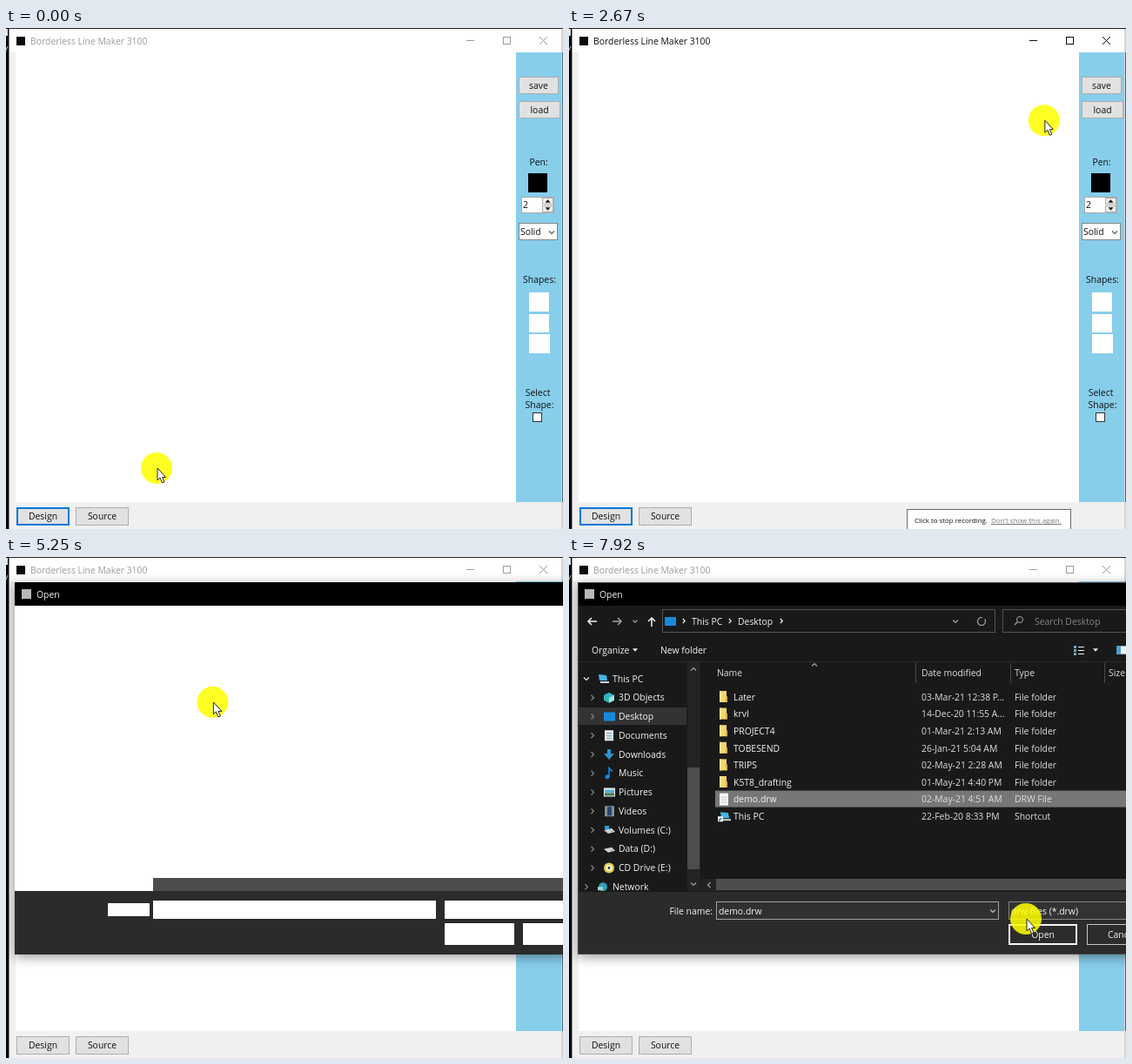
Recreate the animation shown at these times as an HTML page with a canvas. Size 640 px wide and 576 px high, loop 8000 ms.

```html
<!DOCTYPE html>
<html lang="en">
<head>
<meta charset="utf-8">
<title>Drawing tool</title>
<style>
html, body { margin: 0; width: 100%; height: 100%; overflow: hidden; background: #f0f0f0; }
canvas { display: block; width: 640px; height: 576px; }
</style>
</head>
<body>
<canvas id="stage" width="640" height="576"></canvas>
<script>
const view = document.getElementById('stage').getContext('2d');
const layer = document.createElement('canvas');
layer.width = 740; layer.height = 576;
const sheet = layer.getContext('2d');
let g = view;

const LOOP = 8000, STEP = 1000 / 12;
const FORM = '#f0f0f0', LINEN = '#f8ebd8', SKY = '#87ceeb', BUTTON = '#e1e1e1', INK = '#101010';
const BLUE = '#0078d7', PALE = '#f4f4f4', SOFT = '#dedede', MID = '#a6a6a6', DIM = '#6c6c6c';
const LIST = '#191919', PANEL = '#2b2b2b', HOVER = '#4d4d4d', PICKED = '#777777', IDLE = '#333333';

// When the window states change
const AT = { tip: 166, press: 499, source: 666, back: 2249, design: 2332, load: 3249,
  open: 4667, tipEnd: 5166, ready: 5332, desktop: 6249, pick: 7332 };

// Pointer stops: time, x, y
const PATH = [
  [0, 173, 506], [500, 112, 558], [667, 112, 558], [1333, 205, 189], [1583, 350, 68],
  [1750, 535, 120], [2250, 30, 561], [2333, 30, 561], [2667, 546, 106], [2833, 592, 42],
  [3167, 612, 99], [3583, 612, 99], [4400, 98, 208], [4833, 361, 150], [5750, 75, 189],
  [6250, 75, 189], [6917, 212, 276], [7083, 223, 282], [7250, 223, 282], [7917, 525, 416]
];
const TREE = ['This PC', '3D Objects', 'Desktop', 'Documents', 'Downloads', 'Music',
  'Pictures', 'Videos', 'Volumes (C:)', 'Data (D:)', 'CD Drive (E:)', 'Network'];
const DRIVE_ROWS = [
  ['$SysRDAgent', '18-Mar-21 12:26 AM'], ['7K2M+w+Rt', '08-Apr-21 9:48 PM'],
  ['Vorna', '28-Apr-21 12:51 AM'], ['Quelmo', '18-Jul-20 2:40 PM'],
  ['TestLogs', '07-Dec-19 12:14 PM'], ['XQB4', '30-Mar-20 9:58 PM'],
  ['Program Files', '19-Apr-21 11:18 AM'], ['Program Files (x86)', '28-Apr-21 12:48 AM'],
  ['ProgramData', '28-Apr-21 12:51 AM'], ['Recovery', '08-Apr-21 12:43 AM'],
  ['temp', '23-May-20 3:05 PM']
];
const DESKTOP_ROWS = [
  ['Later', '03-Mar-21 12:38 P...'], ['krvl', '14-Dec-20 11:55 A...'],
  ['PROJECT4', '01-Mar-21 2:13 AM'], ['TOBESEND', '26-Jan-21 5:04 AM'],
  ['TRIPS', '02-May-21 2:28 AM'], ['K5T8_drafting', '01-May-21 4:40 PM'],
  ['demo.drw', '02-May-21 4:51 AM', 'DRW File'], ['This PC', '22-Feb-20 8:33 PM', 'Shortcut']
];

function box(x, y, w, h, fill, stroke, lw = 1) {
  if (fill) { g.fillStyle = fill; g.fillRect(x, y, w, h); }
  if (stroke) {
    g.strokeStyle = stroke; g.lineWidth = lw;
    g.strokeRect(x + lw / 2, y + lw / 2, w - lw, h - lw);
  }
}
function text(s, x, y, color = INK, align = 'left', size = 10.4) {
  g.font = `${size}px "Open Sans", "Noto Sans", sans-serif`;
  g.textAlign = align; g.textBaseline = 'alphabetic'; g.fillStyle = color;
  g.fillText(s, x, y + size * 0.36);
  return g.measureText(s).width;
}
function line(points, color, lw = 1) {
  g.beginPath();
  for (let i = 0; i < points.length; i += 2) g.lineTo(points[i], points[i + 1]);
  g.strokeStyle = color; g.lineWidth = lw; g.stroke();
}
function poly(points, fill, stroke) {
  g.beginPath();
  for (let i = 0; i < points.length; i += 2) g.lineTo(points[i], points[i + 1]);
  g.closePath();
  g.fillStyle = fill; g.fill();
  if (stroke) { g.strokeStyle = stroke; g.lineWidth = 1; g.stroke(); }
}
function disc(x, y, r, fill) {
  g.beginPath(); g.arc(x, y, r, 0, 7); g.fillStyle = fill; g.fill();
}
function chevron(x, y, dir, color, s = 3) {
  const p = { down: [-s, -s / 2, 0, s / 2, s, -s / 2], up: [-s, s / 2, 0, -s / 2, s, s / 2],
    right: [-s / 2, -s, s / 2, 0, -s / 2, s], left: [s / 2, -s, -s / 2, 0, s / 2, s] }[dir];
  line(p.map((v, i) => v + (i % 2 ? y : x)), color, 1.1);
}
function triangle(x, y, d, color) { poly([x - 3, y - d, x + 3, y - d, x, y + d], color); }
function arrow(x, y, dx, dy, color) {
  line([x - dx * 5, y - dy * 5, x + dx * 5, y + dy * 5], color, 1.5);
  line([x + dx - dy * 4, y + dy - dx * 4, x + dx * 5, y + dy * 5, x + dx + dy * 4, y + dy + dx * 4], color, 1.5);
}
function button(label, x, y, w, h, focus) {
  box(x, y, w, h, BUTTON, focus ? BLUE : '#adadad', focus ? 2 : 1);
  text(label, x + w / 2, y + h / 2, INK, 'center');
}

function sidebar(loading) {
  box(586, 28, 52, 517, SKY);
  button('save', 589, 56, 46, 20);
  button('load', 589, 84, 48, 20, loading);
  text('Pen:', 612, 154, INK, 'center');
  box(600, 167, 22, 22, '#000');
  box(592, 194, 38, 19, '#fff', '#aaa');
  text('2', 594, 203);
  box(616, 195, 13, 8, FORM, '#adadad');
  box(616, 204, 13, 8, FORM, '#adadad');
  triangle(622.5, 199, -1.7, INK);
  triangle(622.5, 208, 1.7, INK);
  box(589, 224, 45, 20, '#fff', '#858585');
  text('Solid', 591, 234);
  chevron(627, 235, 'down', '#555');
  text('Shapes:', 613, 289, INK, 'center');
  box(601, 304, 23, 22, '#fff');
  box(601, 329, 23, 21, '#fff');
  box(601, 352, 24, 22, '#fff');
  text('Select', 611, 419, INK, 'center');
  text('Shape:', 613, 433, INK, 'center');
  box(605, 442, 11, 11, '#fff', '#333');
}

function sourcePage() {
  box(11, 28, 575, 517, LINEN);
  box(11, 28, 445, 18, '#fff', '#7a7a7a');
  g.save();
  g.beginPath(); g.rect(484, 28, 54, 17); g.clip();
  button('Add', 484, 29, 53, 21);
  g.restore();
  box(13, 45, 540, 311, '#fef8ef');
  box(13, 45, 540, 1, '#696969');
  box(13, 45, 1, 311, '#696969');
}

function mainWindow(t) {
  const active = t >= AT.press && t < AT.load;
  const ink = active ? INK : '#9c9c9c';
  box(0, 0, 640, 576, FORM);
  box(4, 1, 635, 27, '#fff');
  box(0, 0, 640, 1, '#262626');
  box(0, 0, 3, 576, '#000');
  box(0, 1, 2, 8, '#e8e8e8');
  line([0, 26, 2, 21], '#c4c4c4');
  box(3, 1, 1, 575, '#8a8a8a');
  box(12, 10, 10, 10, '#0a0a0a');
  text('Borderless Line Maker 3100', 28, 15, ink);
  line([529, 14.5, 538, 14.5], ink);
  box(571, 10, 9, 9, null, ink);
  line([613, 10, 622, 19], ink);
  line([622, 10, 613, 19], ink);
  if (t >= AT.source && t < AT.design) sourcePage();
  else box(11, 28, 575, 517, '#fff');
  sidebar(t >= AT.load);
  box(638, 1, 2, 575, '#d6d6d6');
  box(639, 28, 1, 517, '#4a6874');
  button('Design', 12, 551, 61, 21, t < AT.press || (t >= AT.back && t < AT.load));
  button('Source', 80, 551, 61, 21, t >= AT.press && t < AT.back);
  if (t >= AT.tip && t < AT.tipEnd) {
    box(388, 553, 189, 24, '#fff', '#6c6c6c');
    text('Click to stop recording.', 397, 566.5, INK, 'left', 7.9);
    const w = text("Don't show this again.", 485, 566.5, '#757575', 'left', 7.9);
    box(485, 570, w, 1, '#757575');
  }
}

function computer(x, y) {
  poly([x - 5, y - 5, x + 4, y - 4, x + 5, y + 2, x - 4, y + 2], '#45b4e8');
  box(x - 3, y + 3, 10, 2, '#cdd3d6');
}
function drive(x, y) {
  poly([x - 6, y, x + 3, y - 2, x + 7, y + 2, x - 1, y + 4], '#d2d2d2');
  box(x + 2, y + 1, 2, 1, '#3bc86a');
}
const ICONS = [
  computer,
  (x, y) => {
    poly([x, y - 6, x + 6, y - 3, x + 6, y + 3, x, y + 6, x - 6, y + 3, x - 6, y - 3], '#2fb5bd');
    poly([x, y, x + 6, y - 3, x + 6, y + 3, x, y + 6], '#a3e5dc');
  },
  (x, y) => box(x - 6, y - 5, 13, 10, '#1689dc'),
  (x, y) => {
    box(x - 5, y - 6, 10, 12, '#f0f0f0');
    for (let k = 0; k < 3; k++) box(x - 3, y - 3 + k * 3, 6, 1, '#4d92ae');
  },
  (x, y) => {
    box(x - 2, y - 6, 4, 6, '#2e94d6');
    poly([x - 6, y - 1, x + 6, y - 1, x, y + 6], '#2e94d6');
  },
  (x, y) => {
    disc(x - 2, y + 4, 2.5, '#1689dc');
    line([x, y + 4, x, y - 6, x + 4, y - 2], '#1689dc', 1.6);
  },
  (x, y) => {
    box(x - 6, y - 5, 13, 10, '#ededed');
    box(x - 5, y - 3, 11, 4, '#56afd8');
    box(x - 5, y + 1, 11, 3, '#40764d');
  },
  (x, y) => {
    box(x - 5, y - 6, 11, 12, '#83919a');
    box(x - 2, y - 5, 5, 10, '#28466a');
  },
  (x, y) => { drive(x, y); box(x - 5, y - 5, 5, 4, '#22a4e4'); },
  drive,
  (x, y) => {
    disc(x, y, 6, '#e8cf48'); disc(x, y, 3.4, '#f5f5e6'); disc(x, y, 1.4, '#333');
  },
  (x, y) => { disc(x, y, 5, '#2fa0bd'); box(x - 6, y, 6, 4, '#a6d3cd'); }
];

function fileIcon(name, type, y) {
  if (type === 'DRW File') {
    box(173, y - 7, 10, 14, '#f8f8f4');
    for (let k = 0; k < 3; k++) box(175, y - 3 + k * 3, 6, 1, '#c8c8c0');
  } else if (type) {
    computer(179, y);
    box(171, y, 6, 6, '#f5f5f5');
    line([172, y + 5, 175, y + 2], '#1769b0', 1.5);
  } else {
    g.globalAlpha = name[0] === '$' || name === 'ProgramData' ? 0.55 : 1;
    box(173, y - 7, 8, 13, '#f8d470');
    box(173, y - 7, 2, 13, '#ffe694');
    box(180, y - 1, 2, 7, '#dcb04c');
    g.globalAlpha = 1;
  }
}

function dialogFrame(fill) {
  box(10, 29, 714, 428, fill);
  box(10, 29, 714, 27, '#000');
  box(18, 37, 11, 11, '#b8b8b8');
  text('Open', 35, 43, PALE);
}

function skeleton() {
  dialogFrame('#fff');
  box(169, 369, 555, 15, HOVER);
  box(10, 384, 714, 73, PANEL);
  box(117, 398, 48, 15, '#fff');
  box(169, 395, 325, 21, '#fff');
  box(504, 395, 210, 21, '#fff');
  box(504, 421, 80, 25, '#fff');
  box(594, 421, 80, 25, '#fff');
}

function toolbar(desk) {
  const place = desk ? 'Desktop' : 'Volumes (C:)';
  arrow(27, 74, -1, 0, desk ? PALE : DIM);
  arrow(55, 74, 1, 0, desk ? MID : DIM);
  chevron(76, 74, 'down', MID, 2.5);
  arrow(95, 75, 0, -1, PALE);
  box(107, 60, 383, 27, null, '#535353');
  ICONS[desk ? 2 : 8](116, 74);
  chevron(132, 73.5, 'right', PALE, 2.5);
  text('This PC', 141, 74, PALE);
  chevron(185, 73.5, 'right', PALE, 2.5);
  const w = text(place, 194, 74, PALE);
  chevron(204 + w, 73.5, 'right', PALE, 2.5);
  chevron(444, 74, 'down', MID);
  g.beginPath(); g.arc(474, 74, 4.5, -0.6, 4.9);
  g.strokeStyle = MID; g.lineWidth = 1.2; g.stroke();
  box(498, 60, 200, 27, null, '#535353');
  g.beginPath(); g.arc(518, 72, 3.5, 0, 7); g.strokeStyle = MID; g.stroke();
  line([515.5, 74.5, 512, 78], MID, 1.2);
  text('Search ' + place, 535, 74, '#858585');
  text('Organize', 26, 107, PALE);
  triangle(76, 107, 1.7, PALE);
  text('New folder', 105, 107, PALE);
  for (let k = 0; k < 3; k++) {
    box(580, 102 + k * 4, 3, 3, '#70a9c6');
    box(585, 103 + k * 4, 7, 1, PALE);
  }
  triangle(605, 107, 1.7, PALE);
  box(629, 102, 14, 10, '#f1f1f1', '#aaa');
  box(629, 102, 5, 10, '#4aa0d0');
  box(10, 120, 714, 1, PANEL);
}

function tree(t, cur, desk) {
  g.save();
  g.beginPath(); g.rect(10, 121, 141, 263); g.clip();
  if (desk) box(10, 173, 125, 20, t < AT.pick ? PICKED : IDLE);
  else {
    if (cur.x < 136 && Math.abs(cur.y - 187) < 11) box(10, 173, 125, 20, HOVER);
    box(10, 303, 125, 21, IDLE);
  }
  TREE.forEach((name, i) => {
    const y = 140 + i * 21.75, top = i === 0 || i === 11;
    if (i === 0) chevron(20, y, 'down', PALE);
    else chevron(top ? 20 : 27, y, 'right', '#8c8c8c');
    ICONS[i](top ? 39 : 46, y);
    text(name, top ? 50 : 57, y, PALE);
  });
  box(136, 121, 15, 263, '#232323');
  box(136, 242, 14, 117, HOVER);
  chevron(143, 129, 'up', MID);
  chevron(143, 376, 'down', MID);
  g.restore();
}

function fileList(t, cur, desk) {
  const rows = desk ? DESKTOP_ROWS : DRIVE_ROWS, typeX = desk ? 512 : 534;
  text('Name', 170, 133, SOFT);
  text('Date modified', 405, 133, SOFT);
  text('Type', typeX, 133, SOFT);
  if (desk) text('Size', 620, 133, SOFT);
  for (const x of desk ? [398, 507, 615] : [399, 528, 636]) box(x, 122, 1, 23, '#4a4a4a');
  chevron(282, 124, 'up', MID);
  const over = cur.x > 168 && cur.y < 370 ? Math.round((cur.y - 161) / 19.6) : -1;
  rows.forEach(([name, date, type], i) => {
    const y = 161 + i * 19.6;
    if (desk && i === 6 && t >= AT.pick) box(168, y - 10, 556, 19, PICKED);
    else if (i === over) box(168, y - 10, 556, 19, HOVER);
    fileIcon(name, type, y);
    text(name, 189, y, PALE);
    text(date, 405, y, SOFT);
    text(type || 'File folder', typeX, y, SOFT);
  });
  box(152, 370, 572, 14, '#232323');
  chevron(161, 377, 'left', MID);
  box(169, 370, desk ? 500 : 451, 13, HOVER);
}

function dialogFooter(t) {
  box(10, 385, 714, 72, PANEL);
  text('File name:', 165, 407, PALE, 'right');
  box(169, 396, 325, 21, '#303030', '#a0a0a0');
  if (t >= AT.pick) text('demo.drw', 172, 407, PALE);
  else if (t < AT.desktop) box(172, 400, 1, 13, PALE);
  chevron(487, 407, 'down', '#c4c4c4');
  box(505, 396, 210, 21, '#333', '#858585');
  text('drw files (*.drw)', 508, 407, PALE);
  box(505, 422, 79, 24, '#2c2c2c', '#f5f5f5', 2);
  text('Open', 544.5, 434.5, PALE, 'center');
  box(595, 422, 79, 24, '#2c2c2c', '#c4c4c4');
  text('Cancel', 635, 434.5, PALE, 'center');
}

// The dialog is painted whole first, so that it fades in as one sheet.
function dialog(t, cur) {
  const a = Math.min(1, (t - AT.open) / 250);
  if (a <= 0.01) return;
  g = sheet;
  g.clearRect(0, 0, 740, 576);
  if (t < AT.ready) skeleton();
  else {
    const desk = t >= AT.desktop;
    dialogFrame(LIST);
    toolbar(desk);
    tree(t, cur, desk);
    fileList(t, cur, desk);
    dialogFooter(t);
    box(10, 29, 714, 428, null, '#484848');
  }
  g = view;
  const s = 0.958 + 0.042 * a;
  g.save();
  g.translate(367, 243); g.scale(s, s); g.translate(-367, -243);
  g.globalAlpha = a;
  g.shadowColor = 'rgba(0,0,0,.4)'; g.shadowBlur = 14; g.shadowOffsetY = 3;
  g.drawImage(layer, 0, 0);
  g.restore();
}

// Smooth path through the stops that never overshoots one.
function glide(axis, i, t) {
  const slope = k => PATH[k] && PATH[k + 1]
    ? (PATH[k + 1][axis] - PATH[k][axis]) / (PATH[k + 1][0] - PATH[k][0]) : 0;
  const tangent = k => {
    const a = slope(k - 1), b = slope(k);
    return a * b > 0 ? 2 * a * b / (a + b) : 0;
  };
  const [p, q] = [PATH[i], PATH[i + 1]], d = q[0] - p[0], u = (t - p[0]) / d;
  const e = u * u * (3 - 2 * u);
  return p[axis] * (1 - e) + q[axis] * e
    + d * u * (1 - u) * ((1 - u) * tangent(i) - u * tangent(i + 1));
}
function pointerAt(t) {
  let i = PATH.length - 2;
  while (i && PATH[i][0] > t) i--;
  return { x: glide(1, i, t), y: glide(2, i, t) };
}

function pointer(t, { x, y }) {
  disc(x, y, 18, 'rgba(255,255,0,.86)');
  g.save();
  g.translate(x, y);
  const beam = t >= AT.source && t < AT.design && x > 13 && x < 553 && y > 28 && y < 356;
  const hand = t >= AT.ready && t < 6400 && x < 136;
  if (beam) {
    line([0.5, -5.5, 6, -5.5], INK);
    line([3, -5.5, 3, 8.5], INK, 1.5);
    line([0.5, 8.5, 6, 8.5], INK);
  } else if (hand) {
    poly([1, 0, 3, 0, 4, 7, 10, 8, 11, 11, 10, 15, 8, 18, 1, 18, -2, 13, -4, 10, -2, 9, 1, 12], '#fff', '#222');
  } else {
    poly([1, 0, 1, 14, 4, 11, 6.5, 17, 9, 16, 6.5, 10.5, 10.5, 10.5], '#fff', '#222');
  }
  g.restore();
}

function draw(now) {
  const t = Math.floor(((now % LOOP) + 5) / STEP) * STEP % LOOP;
  const cur = pointerAt(t);
  mainWindow(t);
  dialog(t, cur);
  pointer(t, cur);
}

const start = performance.now();
function tick() {
  draw(performance.now() - start);
  requestAnimationFrame(tick);
}
tick();
</script>
</body>
</html>
```
